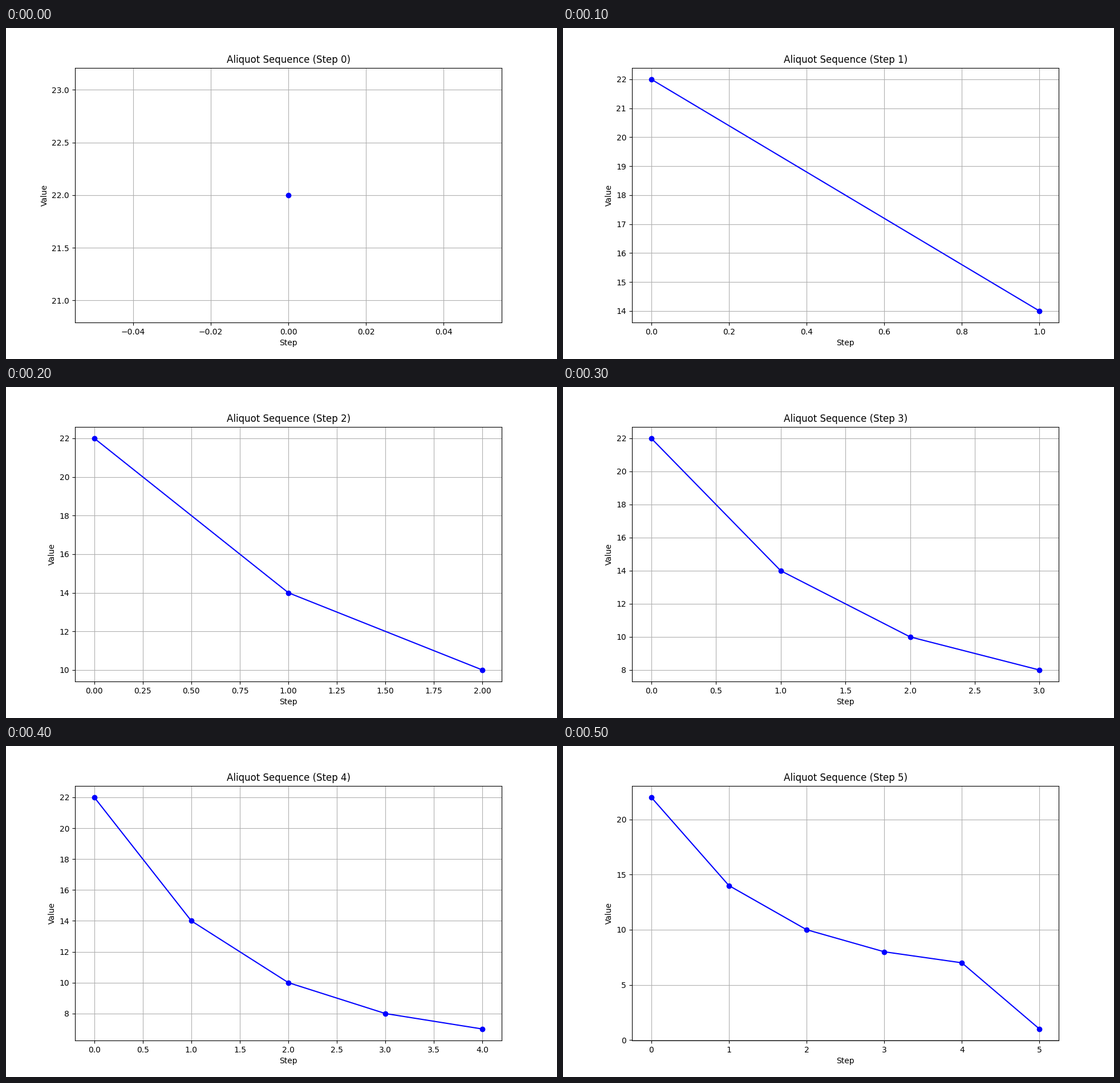
A matplotlib script for the animation above (600 ms loop, 966x580 px).

```python
import matplotlib.pyplot as plt
from matplotlib.animation import FuncAnimation

WIDTH, HEIGHT, DPI = 966, 580, 100
START, STEPS, INTERVAL = 22, 6, 100


def aliquot_sum(n):
    """Sum of the proper divisors of n."""
    return sum(d for d in range(1, n // 2 + 1) if n % d == 0)


def aliquot_sequence(start, length):
    values = [start]
    while len(values) < length:
        values.append(aliquot_sum(values[-1]))
    return values


sequence = aliquot_sequence(START, STEPS)
plt.rcParams["font.family"] = "DejaVu Sans"
fig, ax = plt.subplots(figsize=(WIDTH / DPI, HEIGHT / DPI), dpi=DPI)


def draw(step):
    ax.clear()
    ax.plot(range(step + 1), sequence[:step + 1], marker="o", linestyle="-", color="b")
    ax.set_title(f"Aliquot Sequence (Step {step})")
    ax.set_xlabel("Step")
    ax.set_ylabel("Value")
    ax.grid(True)


anim = FuncAnimation(fig, draw, frames=STEPS, init_func=lambda: draw(0),
                     interval=INTERVAL, repeat=True, repeat_delay=0)
plt.show()
```
